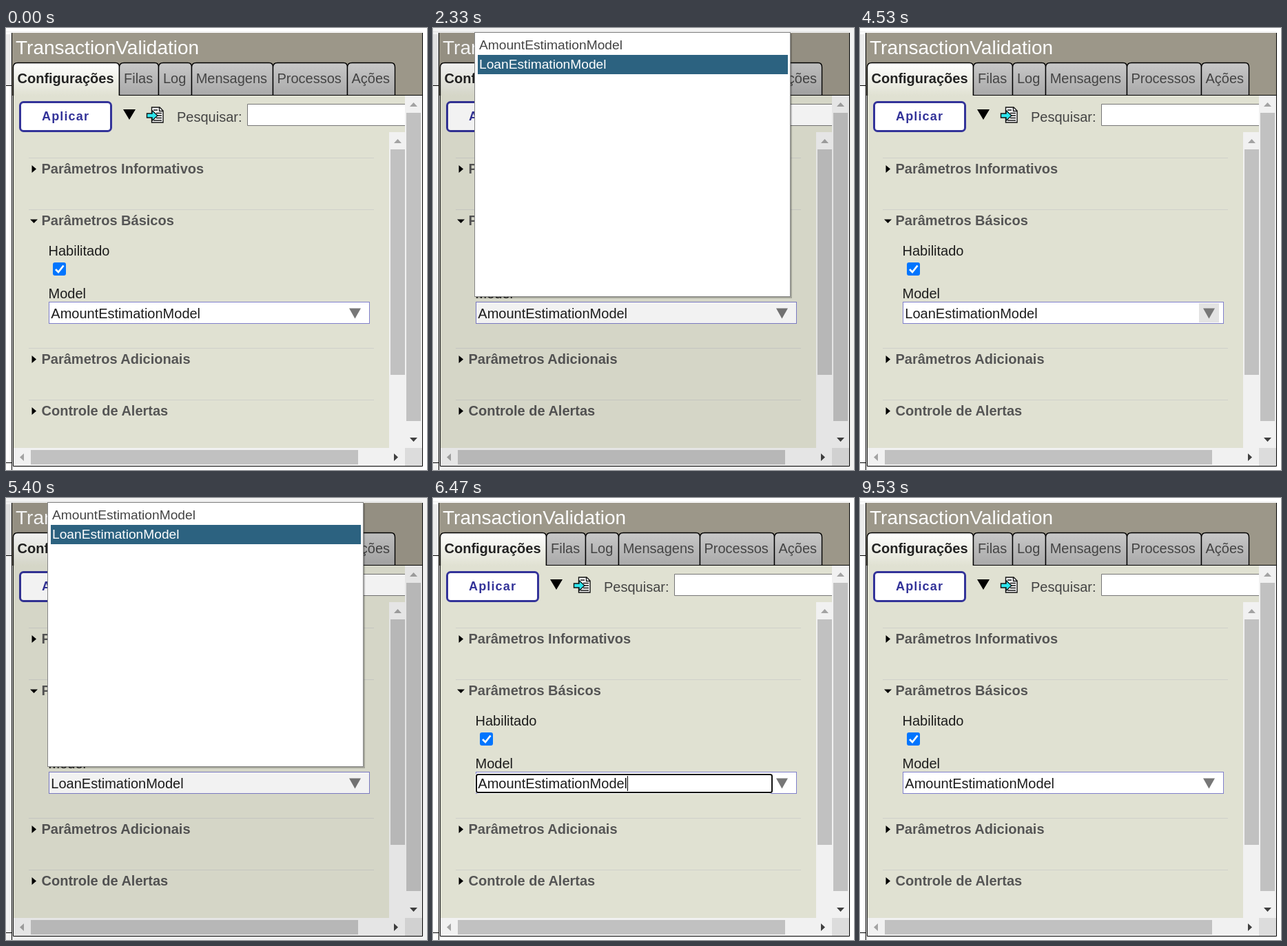
An HTML page for the animation above (9.67 s loop, 611 px wide and 641 px high).

```html
<!DOCTYPE html>
<html lang="pt">
<head>
<meta charset="utf-8">
<title>TransactionValidation</title>
<style>
  html, body { margin: 0; width: 100%; height: 100%; overflow: hidden; background: #fff; }
  svg { display: block; width: 611px; height: 641px; }
  text { font: 20px "Liberation Sans", Arial, sans-serif; fill: #444; white-space: pre; }
  .title { font-size: 28px; fill: #fff; }
  .bold { font-weight: bold; fill: #555; }
  .apply { font-weight: bold; font-size: 18px; letter-spacing: 1.15px; fill: #339; }
  .label { fill: #1c1c1c; }
  .option { font-size: 19.2px; }
  .tip { font: 17px "Open Sans", sans-serif; fill: #575757; }
  .track { fill: #f1f1f1; }
  .thumb { fill: #c1c1c1; }
  .rule { fill: #cfd0ca; }
</style>
</head>
<body>
<svg viewBox="0 0 611 641">
  <defs>
    <linearGradient id="activeTab" x2="0" y2="1">
      <stop stop-color="#fff"/><stop offset="1" stop-color="#e0e1d2"/>
    </linearGradient>
    <linearGradient id="idleTab" x2="0" y2="1">
      <stop stop-color="#c8c8c8"/><stop offset="1" stop-color="#a9a9a9"/>
    </linearGradient>
  </defs>

  <!-- window frame -->
  <rect width="611" height="641" fill="#fff"/>
  <path d="M0 5.5H604" stroke="#ececec"/>
  <rect y="9" width="8" height="74" fill="#ececec"/>
  <path d="M0 83.5H8M0 630.5H8M8.5 7V641" stroke="#000" fill="none"/>
  <rect x="9" y="7" width="595" height="91" fill="#9c9789"/>
  <rect x="11" y="98" width="593" height="537" fill="#e0e1d2"/>
  <text class="title" x="14" y="38">TransactionValidation</text>
  <g id="tabs"></g>
  <path d="M165 97.5H604M10.5 97V635.5H604.5V7" stroke="#000" fill="none"/>

  <!-- toolbar -->
  <rect x="20.5" y="107.5" width="132" height="42" rx="5" fill="#fff" stroke="#339" stroke-width="3"/>
  <text class="apply" x="52" y="134">Aplicar</text>
  <path d="M170 118H188L179 133Z"/>
  <g stroke="#111" stroke-width="1.4">
    <path d="M211.5 115H223L228 120V137H211.5Z" fill="#fff"/>
    <path d="M222.5 115V120.5H228M214 119H220M218 123.5H226M220 127H226M218 130.5H226M214 134H226" fill="none"/>
    <path d="M204.500 124H212V119.500L220 127L212 134.500V130H204.500Z" fill="#2ee6ee"/>
  </g>
  <text x="248" y="136">Pesquisar:</text>
  <path id="search" d="M579 110.500H350.500V141.500H579" fill="#fff"/>

  <!-- sections -->
  <g id="sections"></g>
  <text class="label" x="61.500" y="330">Habilitado</text>
  <rect x="68" y="340" width="19" height="19" rx="3" fill="#0075ff"/>
  <path d="M72 350L76 354L83.500 344.500" fill="none" stroke="#fff" stroke-width="2.700"/>
  <text class="label" x="61.500" y="392">Model</text>

  <!-- combo box -->
  <rect x="62.500" y="397.500" width="465" height="31" fill="#fff" stroke="#7f7fcb"/>
  <rect id="arrow" x="492" y="399" width="29" height="28" fill="#e3e3e3"/>
  <path d="M498 406.500H515L506.500 421.500Z" fill="#777"/>
  <g id="focus">
    <rect x="61.500" y="399.500" width="431" height="29" rx="4" fill="#fff" stroke="#fff"/>
    <rect x="63" y="401" width="429" height="26" rx="2.500" fill="#fff" stroke="#101010" stroke-width="2"/>
  </g>
  <text id="model" class="label" x="65.300" y="421"></text>
  <path id="squiggle" fill="none" stroke="#f22" stroke-width="1.400"/>
  <rect id="caret" y="403" width="1" height="22"/>

  <!-- scrollbars -->
  <rect class="track" x="556" y="151" width="24" height="458"/>
  <rect class="thumb" x="558" y="176" width="21" height="327"/>
  <rect class="track" x="579" y="98" width="25" height="511"/>
  <rect class="thumb" x="581" y="123" width="21" height="447"/>
  <rect class="track" x="11" y="609" width="568" height="26"/>
  <rect id="thumb" x="36" y="612" width="475" height="21"/>
  <rect x="579" y="609" width="25" height="26" fill="#dcdcdc"/>
  <path d="M563 167H574L568.500 161ZM586 114H597L591.500 108ZM26 617V628L20 622.500Z" fill="#a3a3a3"/>
  <path d="M586 594H597L591.500 600ZM563 617V628L569 622.500Z" fill="#404040"/>

  <g id="tip">
    <rect x="350.500" y="36.500" width="195" height="29" fill="#fff" stroke="#767676"/>
    <text class="tip" x="358" y="57">TransactionValidation</text>
  </g>

  <!-- option list -->
  <g id="popup">
    <rect width="611" height="641" fill="#000" opacity=".05"/>
    <rect x="62" y="8" width="459" height="384" fill="#000" opacity=".22"/>
    <rect x="60.500" y="6.500" width="458" height="383" fill="#fff" stroke="#858585"/>
    <g id="options"></g>
  </g>
</svg>
<script>
const LOOP = 9670;
const AMOUNT = "AmountEstimationModel", LOAN = "LoanEstimationModel";
const $ = id => document.getElementById(id);

const tabs = [["Configurações", 11, 165, 16.5], ["Filas", 165, 222, 171], ["Log", 222, 270, 228],
  ["Mensagens", 270, 388, 275.7], ["Processos", 388, 496, 393.5], ["Ações", 496, 565, 501.5]];
$("tabs").innerHTML = tabs.map(([name, left, right, x], i) => `
  <path d="M${left - .5} 98V57Q${left - .5} 50.500 ${left + 6} 50.500H${right - 6}Q${right - .5} 50.500 ${right - .5} 57V98"
    fill="url(#${i ? "idleTab" : "activeTab"})" stroke="#000" stroke-width="1.400"/>
  <text x="${x}" y="80" ${i ? "" : 'style="font-weight:bold;fill:#222"'}>${name}</text>`).join("");
const messagesTab = $("tabs").querySelectorAll("text")[3];

const sections = [["Parâmetros Informativos", 188], ["Parâmetros Básicos", 263, true],
  ["Parâmetros Adicionais", 464], ["Controle de Alertas", 539]];
$("sections").innerHTML = sections.map(([name, y, open]) => `
  <rect class="rule" x="33" y="${y}" width="501" height="1"/>
  <path d="${open ? `M35 ${y + 14.5}H46L40.500 ${y + 20}Z` : `M37.500 ${y + 11}V${y + 22}L44 ${y + 16.5}Z`}"/>
  <text class="bold" x="51.500" y="${y + 23}">${name}</text>`).join("");

$("options").innerHTML = [AMOUNT, LOAN].map((name, i) => `
  <rect x="65" y="${11 + 28 * i}" width="450" height="28" fill="#2c6280"/>
  <text class="option" x="67" y="${31 + 28 * i}">${name}</text>`).join("");
const rowFills = $("options").querySelectorAll("rect");
const rowTexts = $("options").querySelectorAll("text");

// Each step changes only the listed parts; row is the hovered option.
const steps = [
  [0, { model: AMOUNT }],
  [670, { arrow: true }],
  [930, { arrow: false, popup: true }],
  [2330, { row: LOAN }],
  [2400, { row: AMOUNT }],
  [2730, { row: LOAN }],
  [3200, { popup: false, row: "", model: LOAN, focus: true, caret: true, messages: true }],
  [3270, { squiggle: true }],
  [3530, { messages: false }],
  [3600, { search: true }],
  [3730, { search: false, caret: false }],
  [4200, { arrow: true }],
  [4270, { caret: true }],
  [4530, { focus: false, caret: false, squiggle: false }],
  [4670, { arrow: false, popup: true }],
  [5400, { row: LOAN }],
  [5470, { row: AMOUNT }],
  [5600, { row: "" }],
  [6000, { row: AMOUNT }],
  [6470, { popup: false, row: "", model: AMOUNT, focus: true, caret: true }],
  [6530, { squiggle: true }],
  [7000, { caret: false, tip: true }],
  [7530, { caret: true, tip: false, messages: true }],
  [7600, { messages: false }],
  [7870, { search: true }],
  [8070, { caret: false }],
  [8130, { search: false }],
  [8600, { caret: true }],
  [9000, { thumb: true }],
  [9070, { thumb: false, caret: false }],
  [9530, { focus: false, squiggle: false }]
];

function wave(end) {
  let d = "M66 424.500";
  for (let x = 66, up = true; x + 3 <= end; x += 3, up = !up) d += `L${x + 3} ${up ? 421.5 : 424.5}`;
  return d;
}

function draw(state) {
  for (const id of ["arrow", "focus", "squiggle", "caret", "tip", "popup"])
    $(id).style.display = state[id] ? "" : "none";
  const end = state.model === AMOUNT ? 282 : 257;
  $("model").textContent = state.model;
  $("caret").setAttribute("x", end);
  $("squiggle").setAttribute("d", wave(end));
  $("search").setAttribute("stroke", state.search ? "#4f4f4f" : "#767676");
  $("thumb").setAttribute("fill", state.thumb ? "#a8a8a8" : "#c1c1c1");
  messagesTab.style.fill = state.messages ? "#ffe9a8" : "";
  [AMOUNT, LOAN].forEach((name, i) => {
    const hovered = state.row === name;
    rowFills[i].style.display = hovered ? "" : "none";
    rowTexts[i].style.fill = hovered ? "#fff" : "";
  });
}

let shown = 0;
function tick() {
  const time = performance.now() % LOOP;
  const past = steps.filter(([at]) => at <= time);
  if (past.length !== shown) {
    shown = past.length;
    draw(Object.assign({}, ...past.map(([, change]) => change)));
  }
  requestAnimationFrame(tick);
}
tick();
</script>
</body>
</html>
```
